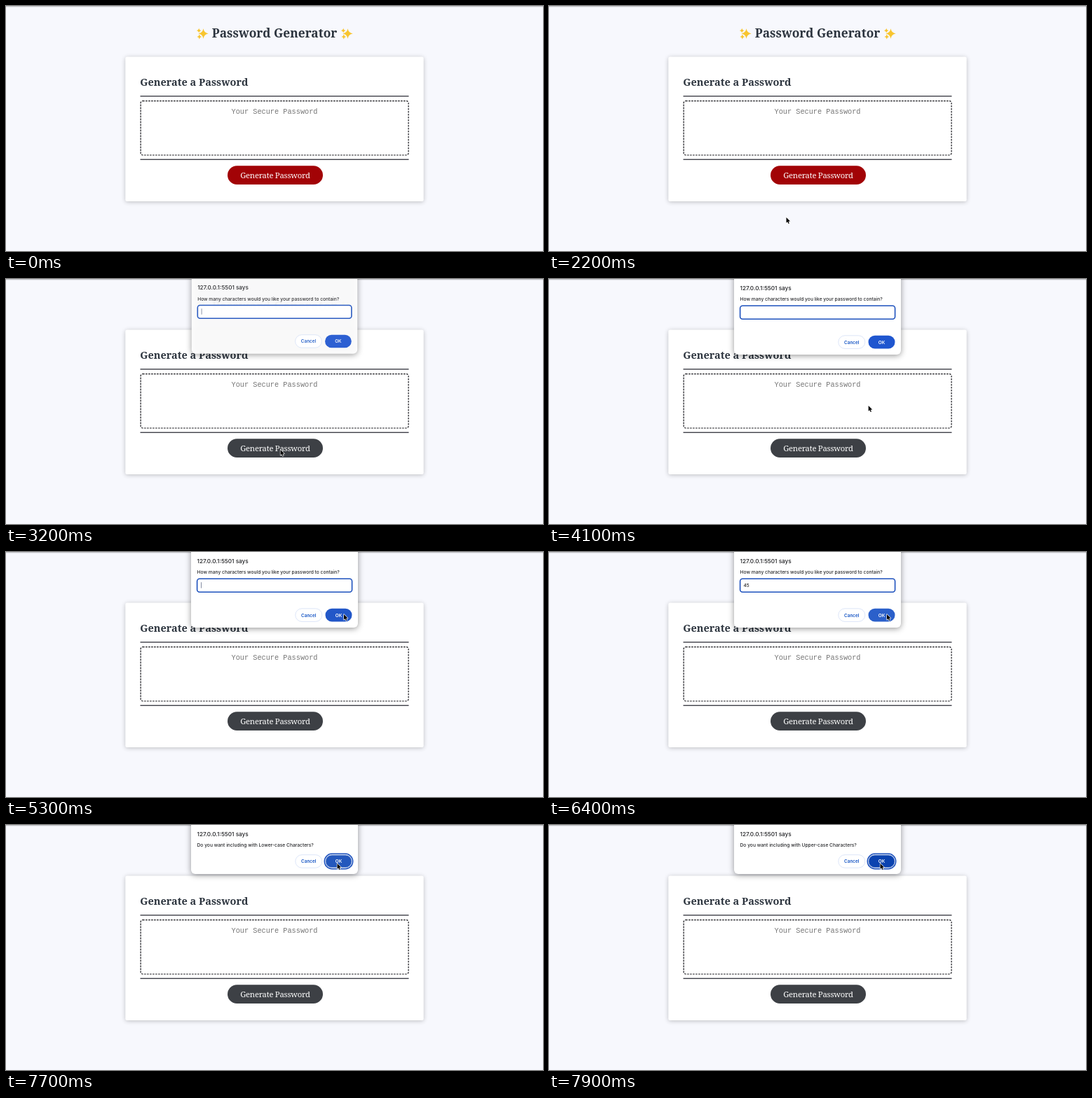
These frames come from a looping animation (766x350 px, 8 s). An HTML page with a canvas:

```html
<!DOCTYPE html>
<html lang="en">
<head>
<meta charset="utf-8">
<title>Password Generator</title>
<style>
  html, body { margin: 0; width: 100%; height: 100%; overflow: hidden; background: #f7f8fd; }
  canvas { display: block; width: 766px; height: 350px; }
</style>
</head>
<body>
<canvas id="stage"></canvas>
<script>
const LOOP = 8000, STEP = 100, W = 766, H = 350;
const canvas = document.getElementById('stage');
const ratio = window.devicePixelRatio || 1;
canvas.width = W * ratio;
canvas.height = H * ratio;
const ctx = canvas.getContext('2d');
ctx.scale(ratio, ratio);

const SERIF = '"Noto Serif", serif', MONO = '"Liberation Mono", monospace', SANS = 'Inter, sans-serif';
const INK = '#2c343e', BLUE = '#1d51bd';

// Pointer path: [time, x, y] of the arrow tip.
const PATH = [
  [2200, 338.5, 302], [2400, 345, 293], [2600, 371, 262], [2800, 391.5, 244],
  [3700, 391.5, 244], [4000, 434, 204], [4300, 499, 135], [4500, 494, 101], [4700, 482, 89],
  [7000, 482, 89], [7200, 480, 78], [7400, 474, 59], [7500, 472.5, 55]
];

const clamp = v => Math.max(0, Math.min(1, v));
const mix = (a, b, k) => a + (b - a) * k;

function pointerAt(t) {
  const i = PATH.findIndex(p => p[0] >= t);
  if (i < 0) return PATH[PATH.length - 1].slice(1);
  if (i === 0) return PATH[0].slice(1);
  const [a, b] = [PATH[i - 1], PATH[i]];
  const k = (t - a[0]) / (b[0] - a[0]);
  return [mix(a[1], b[1], k), mix(a[2], b[2], k)];
}

function text(str, x, y, font, color, align = 'left', spacing = 0) {
  ctx.font = font;
  ctx.letterSpacing = spacing + 'px';
  ctx.textAlign = align;
  ctx.fillStyle = color;
  ctx.fillText(str, x, y);
}

function box(x, y, w, h, r, fill, stroke, line = 1) {
  ctx.beginPath();
  ctx.roundRect(x, y, w, h, r);
  if (fill) { ctx.fillStyle = fill; ctx.fill(); }
  if (stroke) { ctx.strokeStyle = stroke; ctx.lineWidth = line; ctx.stroke(); }
}

function shadowBox(x, y, w, h, r, color, blur, dy) {
  ctx.save();
  ctx.shadowColor = color;
  ctx.shadowBlur = blur * ratio;
  ctx.shadowOffsetY = dy * ratio;
  box(x, y, w, h, r, '#fff');
  ctx.restore();
}

function star(x, y, r) {
  ctx.beginPath();
  ctx.moveTo(x, y - r);
  for (let i = 1; i <= 4; i++) {
    const a = i * Math.PI / 2, m = a - Math.PI / 4, q = r * 0.2;
    ctx.quadraticCurveTo(x + Math.sin(m) * q, y - Math.cos(m) * q, x + Math.sin(a) * r, y - Math.cos(a) * r);
  }
  ctx.fillStyle = '#f8c52f';
  ctx.fill();
}

function sparkles(x) {
  star(x + 9.5, 39.5, 7.2);
  star(x + 3.2, 35, 3.6);
  star(x + 3.8, 44, 3.4);
}

function page(hover) {
  ctx.fillStyle = '#f7f8fd';
  ctx.fillRect(0, 0, W, H);
  ctx.fillStyle = '#bfc0c4';
  ctx.fillRect(0, 0, W, 1.3);
  sparkles(272);
  sparkles(478);
  text('Password Generator', 383, 45.3, `bold 17.3px ${SERIF}`, INK, 'center');

  shadowBox(170.3, 72.5, 425.4, 206.5, 2.5, 'rgba(0,0,0,.24)', 6, 1);
  text('Generate a Password', 191.3, 113.8, `bold 14.5px ${SERIF}`, INK);
  ctx.fillStyle = '#30313a';
  ctx.fillRect(191.5, 128.2, 383, 1.3);
  ctx.fillRect(191.5, 218.6, 383, 1.3);
  ctx.setLineDash([2.6, 1.4]);
  box(192.1, 135.6, 382, 77.4, 3, null, '#15151a', 1.2);
  ctx.setLineDash([]);
  text('Your Secure Password', 383, 153.5, `10.25px ${MONO}`, '#757575', 'center');

  box(316, 228.3, 136, 26.7, 13.35, hover ? '#3d4045' : '#a20306');
  text('Generate Password', 384, 245.6, `11.3px ${SERIF}`, '#fff', 'center', -0.25);
}

function actions(y, fill, focused) {
  box(412.8, y, 38, 18.6, 9.3, '#fff', '#d3dff6', 0.8);
  text('Cancel', 431.8, y + 11.7, `600 6.4px ${SANS}`, '#1454c4', 'center');
  if (focused) box(454.3, y - 1.5, 40.4, 21.6, 10.8, null, BLUE, 1.5);
  box(455.5, y, 38, 18.6, 9.3, fill);
  if (focused) box(455.8, y + 0.3, 37.4, 18, 9, null, '#fff', 0.6);
  text('OK', 474.5, y + 11.7, `600 6.4px ${SANS}`, '#fff', 'center');
}

function dialog(height, message) {
  shadowBox(264, -8, 238, height + 8, 6, 'rgba(0,0,0,.42)', 8, 1.5);
  text('127.0.0.1:5501 says', 272.5, 16.1, `500 8.2px ${SANS}`, '#202124');
  text(message, 272.5, 31.4, `500 6.7px ${SANS}`, '#27282b');
}

function prompt(t) {
  dialog(108, 'How many characters would you like your password to contain?');
  box(272.6, 38.3, 221, 18.9, 3.5, '#fff', BLUE, 1.6);
  const typed = t < 5400 ? '' : t < 5600 ? '4' : '45';
  text(typed, 277.5, 50, `500 6.5px ${SANS}`, '#222');
  const since = t - (t < 5400 ? 3300 : t < 5600 ? 5400 : 5600);
  if (Math.floor(since / 500) % 2 === 0 || since < 0) {
    ctx.fillStyle = '#66718c';
    ctx.fillRect(278 + typed.length * 4.2, 43.2, 0.8, 8.4);
  }
  actions(80.8, t >= 6400 ? '#2b60ca' : t >= 4700 ? '#2257c8' : '#1f56cf');
}

function confirmBox(kind, pressed) {
  dialog(70, `Do you want including with ${kind}-case Characters?`);
  actions(42.6, pressed ? '#2458bd' : '#0b43b0', true);
}

function layer(alpha, draw) {
  const art = clamp(alpha);
  if (!art) return;
  ctx.save();
  ctx.globalAlpha = art;
  const scale = mix(0.9, 1, art);
  ctx.translate(383 * (1 - scale), -9 * (1 - art));
  ctx.scale(scale, scale);
  draw();
  ctx.restore();
}

function dialogs(t) {
  if (t < 3000) return;
  if (t < 6500) {
    const opening = 1 - Math.pow(1 - clamp((t - 2900) / 500), 3);
    layer(opening, () => prompt(t));
  } else if (t < 6600) {
    layer(0.6, () => confirmBox('Lower'));
  } else if (t < 7800) {
    confirmBox('Lower', t >= 7700);
  } else if (t < 7900) {
    layer(0.6, () => confirmBox('Upper'));
  } else {
    confirmBox('Upper');
  }
}

function pointer(x, y) {
  ctx.save();
  ctx.translate(x, y);
  ctx.beginPath();
  [[0, 0], [0, 7.8], [1.8, 6.2], [3, 9], [4.3, 8.4], [3.1, 5.7], [5.5, 5.6]].forEach(p => ctx.lineTo(...p));
  ctx.closePath();
  ctx.lineJoin = 'round';
  ctx.strokeStyle = '#fff';
  ctx.lineWidth = 1.3;
  ctx.stroke();
  ctx.fillStyle = '#000';
  ctx.fill();
  ctx.restore();
}

function frame(now) {
  const t = Math.floor((now % LOOP) / STEP) * STEP;
  page(t >= 2700);
  dialogs(t);
  if (t >= 2200) pointer(...pointerAt(t));
  requestAnimationFrame(frame);
}
requestAnimationFrame(frame);
</script>
</body>
</html>
```
